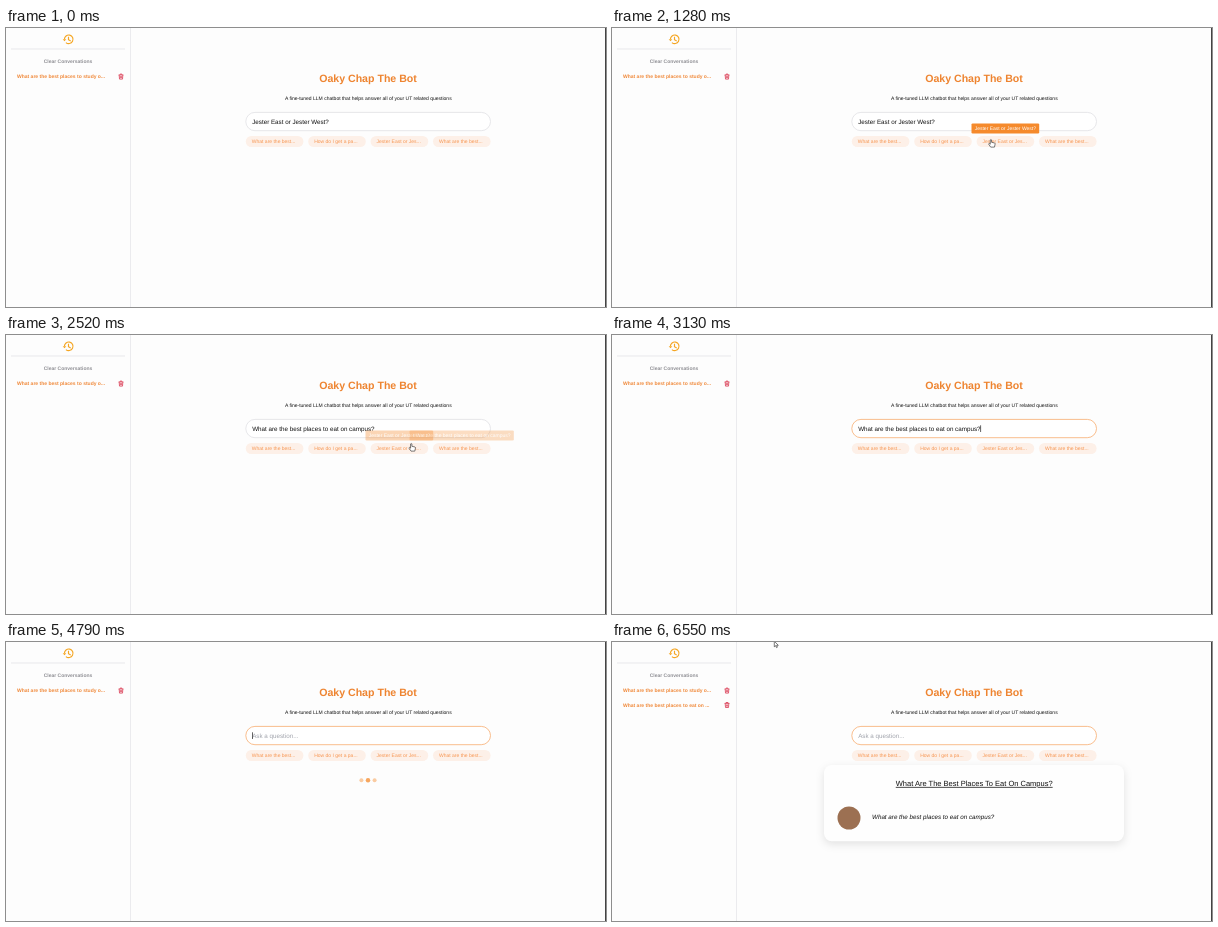
An HTML page for the animation above (6.82 s loop, 600 px wide and 279 px high).

```html
<!DOCTYPE html>
<html lang="en">
<head>
<meta charset="utf-8">
<title>Campus chatbot</title>
<style>
html, body { margin: 0; width: 100%; height: 100%; overflow: hidden; background: #fdfdfd; }
svg { display: block; width: 600px; height: 279px; }
text { font-family: "Liberation Sans", Arial, sans-serif; font-size: 5px; text-rendering: geometricPrecision; white-space: pre; }
.mid { text-anchor: middle; }
.bold { font-weight: bold; }
.field { font-size: 6.25px; }
.item { fill: #f0893a; font-weight: bold; }
.chip rect { fill: #fdf0e8; }
.chip text { fill: #f79550; }
.tip rect { fill: #f58a2c; }
.tip text { fill: #fff; }
.card { filter: drop-shadow(0 3px 4px rgba(0, 0, 0, .11)); }
.pointer path { fill: #fff; stroke: #333; stroke-width: .65; stroke-linejoin: round; }
</style>
</head>
<body>
<svg viewBox="0 0 600 279">
  <defs>
    <g id="trash" fill="none" stroke="#d9304a" stroke-width=".75">
      <path d="M-2.5-1.7H2.5M-1-1.9V-2.6H1V-1.9M-1.8-1.6L-1.5 2.4H1.5L1.8-1.6M-.6-.6V1.5M.6-.6V1.5"/>
    </g>
  </defs>

  <rect width="600" height="279" fill="#fdfdfd"/>
  <path d="M124.5 0V279" stroke="#ebebee"/>
  <path d="M5 21H119" stroke="#dedee2" stroke-width=".7"/>
  <path d="M599.5 0V279" stroke="#444"/>

  <g fill="none" stroke="#f5a623" stroke-width="1.15">
    <path d="M58.4 11.3A4.3 4.3 0 1 1 59.9 14.6M62.5 8.8V11.7L64.7 13"/>
    <path d="M56.7 11.2H60.3L58.5 13.2Z" fill="#f5a623" stroke="none"/>
  </g>
  <text class="mid bold" x="62" y="35" fill="#8f8f94">Clear Conversations</text>
  <text class="item" x="11" y="50.2">What are the best places to study o...</text>
  <use href="#trash" x="115" y="48.7"/>
  <g id="entry">
    <text class="item" x="11" y="64.7">What are the best places to eat on ...</text>
    <use href="#trash" x="115" y="63.1"/>
  </g>

  <text class="mid bold" x="362" y="53.5" fill="#ee8430" style="font-size:10.6px">Oaky Chap The Bot</text>
  <text class="mid" x="362.3" y="72.1" fill="#111">A fine-tuned LLM chatbot that helps answer all of your UT related questions</text>

  <rect id="box" x="239.8" y="84.4" width="244.7" height="18.3" rx="9.15" fill="#fff" stroke-width=".8"/>
  <text id="value" class="field" x="246.2" y="95.8"></text>
  <path id="caret" stroke="#222" stroke-width=".7"/>

  <g id="chips"></g>
  <g id="dots" fill="#f58a2c"></g>

  <g id="answer">
    <rect class="card" x="212" y="123" width="300" height="76.3" rx="8" fill="#fefefe"/>
    <text class="mid" x="362.2" y="143.9" fill="#111" style="font-size:7.5px" text-decoration="underline">What Are The Best Places To Eat On Campus?</text>
    <circle cx="237" cy="176" r="11.5" fill="#9c7052"/>
    <text class="field" x="260" y="177" fill="#111" font-style="italic">What are the best places to eat on campus?</text>
  </g>

  <g id="tips"></g>

  <g class="pointer">
    <path id="hand" d="M-.6 .6Q0-.3 .7 .6V3L3.8 3.7Q4.4 4 4.2 5L3.6 7.8H-.2L-2.1 5Q-2.3 4.1-1.5 4.2L-.6 4.9Z"/>
    <path id="arrow" d="M0 0V5.6L1.3 4.5L2.2 6.4L3.1 6L2.3 4.1H4Z"/>
    <path id="beam" d="M-1.3-3.4H1.3M0-3.4V3.4M-1.3 3.4H1.3"/>
  </g>
</svg>
<script>
const LOOP = 6820, FOCUS = 2790, SEND = 3460, REPLY = 4850, BLINK = 275;
const FIRST = 'Jester East or Jester West?';
const SECOND = 'What are the best places to eat on campus?';
const $ = id => document.getElementById(id);
const clamp = v => Math.min(1, Math.max(0, v));
const ramp = (t, from, to) => clamp((t - from) / (to - from));
const show = (el, on) => { el.style.display = on ? '' : 'none'; };

function add(parent, tag, attrs, text) {
  const el = document.createElementNS('http://www.w3.org/2000/svg', tag);
  for (const key in attrs) el.setAttribute(key, attrs[key]);
  if (text) el.textContent = text;
  return parent.appendChild(el);
}

function label(parent, cls, x, y, width, height, radius, pad, text) {
  const g = add(parent, 'g', { class: cls });
  add(g, 'rect', { x, y, width, height, rx: radius });
  add(g, 'text', { x: x + pad, y: y + height / 2 + 1.7 }, text);
  return g;
}

['What are the best...', 'How do I get a pa...', 'Jester East or Jes...', 'What are the best...']
  .forEach((s, i) => label($('chips'), 'chip', 239.8 + i * 62.4, 107.9, 57.6, 11.2, 5.6, 6, s));
const tipJester = label($('tips'), 'tip', 359.5, 95.4, 67.7, 10, 1.2, 3.2, FIRST);
const tipEat = label($('tips'), 'tip', 403.5, 95.4, 104.3, 10, 1.2, 3.3, SECOND);
const dots = [0, 1, 2].map(() => add($('dots'), 'circle', { r: 2.4 }));

// Pointer stops: time, x, y, shape used from that time on
const stops = [
  [400, 388, 93, 'beam'], [540, 381, 107, 'hand'], [670, 378, 109, 'hand'],
  [730, 378, 109, 'hand'], [880, 378.5, 111.3, 'hand'], [1280, 378.5, 111.3, 'hand'],
  [1500, 461.5, 115.3, 'hand'], [2270, 461.5, 115.3, 'hand'], [2520, 405.5, 108.4, 'hand'],
  [2580, 388, 103, 'beam'], [2640, 370, 99.3, 'beam'], [3130, 370, 99.3, ''],
  [6190, 290, 93, 'beam'], [6260, 272, 82, 'arrow'], [6550, 162.3, -.8, 'arrow'], [LOOP, 162.3, -.8, '']
];

function pointerAt(t) {
  const i = stops.findIndex((s, n) => n + 1 < stops.length && t >= s[0] && t < stops[n + 1][0]);
  if (i < 0) return [0, 0, ''];
  const [t0, x0, y0, shape] = stops[i], [t1, x1, y1] = stops[i + 1];
  const k = ramp(t, t0, t1);
  return [x0 + (x1 - x0) * k, y0 + (y1 - y0) * k, shape];
}

function beat(phase) {
  return Math.abs(1 - 2 * (phase - Math.floor(phase)));
}

function caretOn(t) {
  if (t < SEND) return t >= FOCUS && t < 3310;
  return Math.floor((t - SEND) / BLINK) % 2 === 0;
}

function render(t) {
  const sent = t >= SEND, focused = t >= FOCUS;
  $('value').textContent = sent ? 'Ask a question...' : t < 1900 ? FIRST : SECOND;
  $('value').setAttribute('fill', sent ? '#a0a3ab' : '#111');
  $('box').setAttribute('stroke', focused ? '#f8ae72' : '#e1e1e5');
  show($('caret'), caretOn(t));
  $('caret').setAttribute('d', `M${sent ? 246.5 : 368.6} 90.3V97`);

  tipJester.style.opacity = t < 2000
    ? ramp(t, 730, 880) * (1 - ramp(t, 1400, 1550))
    : .35 * ramp(t, 2440, 2520) * (1 - ramp(t, 2550, 2640));
  tipEat.style.opacity = ramp(t, 1460, 1630) * (1 - ramp(t, 2410, 2565));

  show($('dots'), sent && t < REPLY);
  dots.forEach((dot, i) => {
    const level = beat((t - 3495) / 700 + (i % 2 ? 0 : .5));
    dot.setAttribute('transform', `translate(${355.4 + i * 6.6} 138.3) scale(${.75 + .25 * level})`);
    dot.style.opacity = .2 + .8 * level;
  });

  show($('answer'), t >= REPLY);
  $('answer').style.opacity = ramp(t, REPLY, 5670);
  $('entry').style.opacity = ramp(t, REPLY, 5300);

  const [x, y, shape] = pointerAt(t);
  for (const id of ['hand', 'arrow', 'beam']) {
    show($(id), id === shape);
    $(id).setAttribute('transform', `translate(${x} ${y})`);
  }
}

const start = performance.now();
function tick() {
  render((performance.now() - start) % LOOP);
  requestAnimationFrame(tick);
}
tick();
</script>
</body>
</html>
```
